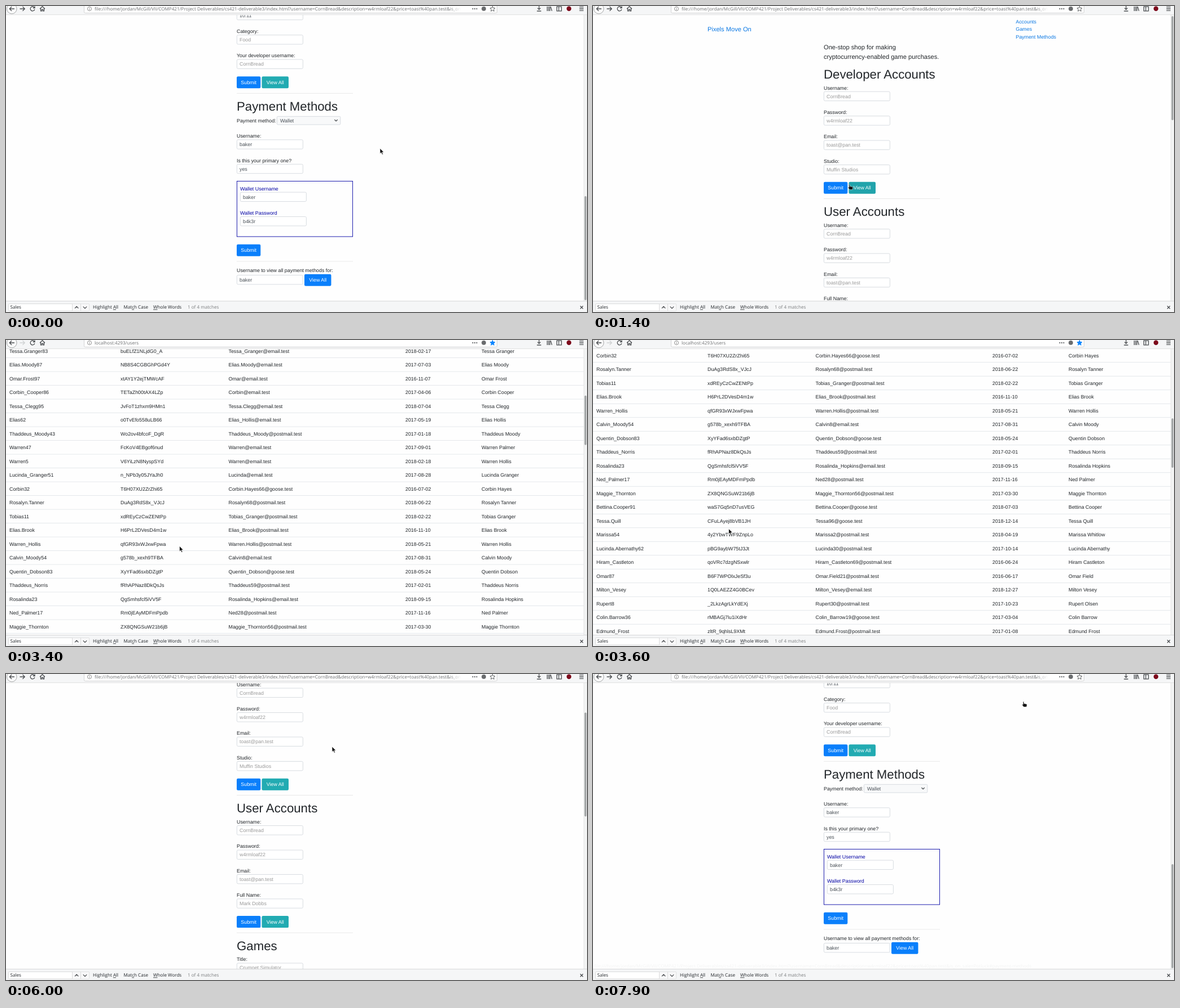
An HTML page for the animation above (8 s loop, 1030 px wide and 544 px high).

```html
<!DOCTYPE html>
<html lang="en">
<head>
<meta charset="utf-8">
<title>Game store demo</title>
<style>
html, body { margin: 0; width: 100%; height: 100%; overflow: hidden; background: #fefefe; }
svg { display: block; width: 1030px; height: 544px; text-rendering: geometricPrecision; }
text { font-family: "Liberation Sans", Arial, sans-serif; white-space: pre; }
.ui text { font-family: "Open Sans", "Noto Sans", sans-serif; }
.icon { fill: none; stroke: #4a4d50; stroke-width: 1.3; }
.u { text-decoration: underline; }
</style>
</head>
<body>
<svg id="stage" viewBox="0 0 1030 544"></svg>
<script>
const LOOP = 8000, STEP = 100;
const BASE = 8.89, LEAD = 11.11, TITLE = 22.22;
const FIELD = 43.4, ROW = 24.5, END = 806.4;
const INK = '#212529', MUTED = '#999', VALUE = '#495057', BLUE = '#0a7ffb', TEAL = '#22abb2', LINK = '#0b78e3', NAVY = '#0000a4';

// Markup helpers; y is the vertical middle of the text or box
const text = (x, y, s, size = BASE, fill = INK, more = '') =>
  `<text x="${x}" y="${y + size * .36}" font-size="${size}" fill="${fill}" ${more}>${s}</text>`;
const rect = (x, y, w, h, fill, more = '') =>
  `<rect x="${x}" y="${y}" width="${w}" height="${h}" fill="${fill}" ${more}/>`;
const path = (d, more = 'class="icon"') => `<path d="${d}" ${more}/>`;
const group = (id, s, more = '') => `<g id="${id}" ${more}>${s}</g>`;
const rule = y => rect(409, y - .4, 206, .8, '#e3e3e3');

const input = (x, y, s, fill = MUTED) =>
  rect(x + .4, y - 8.2, 117, 16.4, '#fff', 'rx="2" stroke="#ced4da" stroke-width=".8"') +
  text(x + 5, y, s, BASE, fill);
const field = (x, y, label, s, fill, ink) => text(x, y, label, BASE, ink) + input(x, y + 15, s, fill);
const button = (x, y, w, s, fill, hover = '') =>
  rect(x, y - 10.5, w, 21, fill, 'rx="2.2"') +
  (hover && rect(x, y - 10.5, w, 21, '#1c8a94', `rx="2.2" id="${hover}" opacity="0"`)) +
  text(x + w / 2, y, s, BASE, '#fff', 'text-anchor="middle"');

function section(y, title, fields, hover) {
  const end = y + 24.4 + FIELD * fields.length;
  return text(409, y, title, TITLE) +
    fields.map(([label, s, fill], i) => field(409, y + 24.4 + FIELD * i, label, s, fill)).join('') +
    button(409, end + 4.2, 42.3, 'Submit', BLUE) +
    button(453.5, end + 4.2, 47.5, 'View All', TEAL, hover) +
    rule(end + 23.6);
}

const login = [['Username:', 'CornBread'], ['Password:', 'w4rmloaf22'], ['Email:', 'toast@pan.test']];

const payment =
  text(409, 178, 'Payment Methods', TITLE) +
  text(409, 203.5, 'Payment method:') +
  rect(480.4, 196.3, 112.4, 14.6, '#f8f9fa', 'rx="1.5" stroke="#ced4da" stroke-width=".8"') +
  text(486, 203.5, 'Wallet', BASE, VALUE) +
  path('M582.5 202l2.6 2.6 2.6-2.6') +
  field(409, 231, 'Username:', 'baker', VALUE) +
  field(409, 274.5, 'Is this your primary one?', 'yes', VALUE) +
  rect(409.4, 311.4, 205.2, 98.6, 'none', `stroke="${NAVY}" stroke-width=".9"`) +
  field(415, 324.3, 'Wallet Username', 'baker', VALUE, NAVY) +
  field(415, 367.7, 'Wallet Password', 'b4k3r', VALUE, NAVY) +
  button(409, 434.2, 42.3, 'Submit', BLUE) + rule(454) +
  text(409, 470, 'Username to view all payment methods for:') +
  input(409, 486.7, 'baker', VALUE) +
  button(529, 487.2, 47.5, 'View All', BLUE);

const home =
  text(203, 41, 'Pixels Move On', LEAD, LINK) +
  text(749.5, 27.5, 'Accounts', BASE, LINK) +
  text(749.5, 41, 'Games', BASE, LINK) +
  text(749.5, 54.3, 'Payment Methods', BASE, LINK, 'id="payLink"') +
  text(409, 73.5, 'One-stop shop for making', LEAD) +
  text(409, 90.2, 'cryptocurrency-enabled game purchases.', LEAD) +
  section(121, 'Developer Accounts', [...login, ['Studio:', 'Muffin Studios']], 'devHover') +
  section(365.4, 'User Accounts', [...login, ['Full Name:', 'Mark Dobbs']], 'userHover') +
  section(609.8, 'Games', [
    ['Title:', 'Crumpet Simulator'], ['Description:', 'Bake all day'], ['Price:', '20.22'],
    ['Is on sale?', 'yes'], ['Sale price:', '10.11', VALUE], ['Category:', 'Food'],
    ['Your developer username:', 'CornBread']]) +
  `<g transform="translate(0 ${END})">${payment}</g>`;

// User table: full name | user name | password | mail | date; F and L stand for first and last name
const people = `Corbin Hayes|F32|T6H07XU2ZrZhi65|F.L66@y|2016-07-02
Rosalyn Tanner|F.L|DuAg3RdS8x_VJcJ|F68@h|2018-06-22
Tobias Granger|F11|xdREyCzCwZENtPp|F_L@h|2018-02-22
Elias Brook|F.L|H6PrL2DVesD4m1w|F_L@h|2016-11-10
Warren Hollis|F_L|qfGR93xWJxwFpwa|F.L@h|2018-05-21
Calvin Moody|F_L54|g578b_xexh9TFBA|F8@g|2017-08-31
Quentin Dobson|F_L83|XyYFad6sxbDZgtP|F_L@y|2018-05-24
Thaddeus Norris|F_L|fRhAPNaz8DkQsJs|F59@h|2017-02-01
Rosalinda Hopkins|F23|QgSmhsfcl5iVV5F|F_L@g|2018-09-15
Ned Palmer|F_L17|Rm0jEAyMDFmPpdb|F28@h|2017-11-16
Maggie Thornton|F_L|ZX8QNGSuW21b6jB|F_L56@h|2017-03-30
Bettina Cooper|F.L91|waS7Gq5nD7usVEG|F.L@y|2018-07-03
Tessa Quill|F.L|CFuLAyej8bVB1JH|F96@y|2018-12-14
Marissa Whitlow|F54|4y2YbwTWF9ZnpLo|F2@h|2018-04-19
Lucinda Abernathy|F.L62|pBG9aybW75tJ3Jt|F30@h|2017-10-14
Hiram Castleton|F_L|qoVRc7dzgNSxwlr|F_L69@h|2016-06-24
Omar Field|F87|B6F7WPOlxJeSf3u|F.L21@h|2016-06-17
Milton Vesey|F_L|1Q0LAEZZ4G0BCev|F_L@g|2018-12-27
Rupert Olsen|F8|_2LkzAgrLkYdEXj|F30@h|2017-10-23
Colin Barrow|F.L36|rMBAGj7lu1iXdHr|F_L19@y|2017-03-04
Edmund Frost|F_L|zltR_9qhlsL9XMt|F.L@h|2017-01-08
Nora Jenkins|F49|0esHSBt0lbQ3sXL|F63@g|2017-08-28
Sabina Clegg|F.L87|_hQoAR_G6Pr28km|F.L@g|2017-04-28`.split('\n').map(s => s.split('|'));
const hosts = { h: 'postmail.test', y: 'goose.test', g: 'email.test' };

let seed = 7;
const rnd = n => (seed = (seed * 16807) % 2147483647) % n;
const chars = 'ABCDEFGHJKLMNPRSTUVWXYZabcdefghijkmnoprstuvwxyz0123456789_';
const two = n => String(n + 1).padStart(2, '0');
function stranger() {
  const first = people[rnd(23)][0].split(' ')[0], last = people[rnd(23)][0].split(' ')[1];
  return [`${first} ${last}`, ['F_L', 'F.L', 'F'][rnd(3)] + rnd(99),
    Array.from({ length: 15 }, () => chars[rnd(chars.length)]).join(''),
    ['F_L@', 'F.L@', 'F@'][rnd(3)] + 'hyg'[rnd(3)],
    `${2016 + rnd(3)}-${two(rnd(12))}-${two(rnd(28))}`];
}

const columns = [6, 203, 394.5, 708, 843];
const PICKED = 41;
const rows = [...Array.from({ length: 28 }, stranger), ...people];
const line = (cells, i, more = '') => {
  const y = 27.5 + ROW * i;
  return cells.map((s, c) => text(columns[c], y, s, BASE, INK,
    more + (i === PICKED + 1 && !c ? ' id="picked"' : ''))).join('') +
    rect(0, y + ROW / 2 - .4, 1024, .8, '#dee2e6');
};
const table = rect(6, 27.5 + ROW * (PICKED + 1) - 5.5, 41, 11, '#4a90d9', 'id="mark"') +
  line(['Username', 'Password', 'Email', 'Date Created', 'Full Name'], 0, 'font-weight="bold"') +
  rows.map(([name, user, pass, mail, date], i) => {
    const [first, last] = name.split(' ');
    const fill = s => s.replace(/[FL]/g, c => c === 'F' ? first : last);
    const [box, host] = mail.split('@');
    return line([fill(user), pass, `${fill(box)}@${hosts[host]}`, date, name], i + 1);
  }).join('');

// Browser frame
const UI = 8.1;
const address = ('file:///home/jordan/McGill/VII/COMP421/Project Deliverables/cs421-deliverable3/' +
  'index.html?username=CornBread&description=w4rmloaf22&price=toast%40pan.test&is_on_sa').replace(/&/g, '&amp;');
const under = s => `<tspan class="u">${s}</tspan>`;
const toolbar =
  rect(0, 0, 1030, 16, '#f5f6f7') + rect(0, 15.2, 1030, .8, '#dcdddd') +
  rect(138.5, -8, 732, 20.5, '#fff', 'rx="2" stroke="#c9cacb" stroke-width=".8"') +
  '<circle cx="10.3" cy="5" r="8.8" fill="#fbfbfb" stroke="#9a9c9e" stroke-width=".9"/>' +
  path('M15 5H6.5M10 1.3L6.3 5l3.7 3.7') +
  path('M24.5 5h8.5M29.5 1.3L33.2 5l-3.7 3.7', 'class="icon" id="forward"') +
  path('M50.2 2.6A3.9 3.9 0 1 0 50.8 6M51 .5v3h-3') +
  path('M60 5l4.5-4.2L69 5M61.5 4.6v4.2h2v-2.6h2v2.6h2V4.6') +
  '<circle cx="148" cy="5" r="3.6" class="icon" style="stroke:#777;stroke-width:.8"/>' +
  path('M148 4.5v2.6M148 2.8v.9', 'class="icon" style="stroke:#777;stroke-width:.9"') +
  text(157, 5, '', UI, '#6c6e70', 'id="address"') +
  rect(786, 0, 38, 12, 'url(#fade)') +
  [827.5, 831, 834.5].map(x => `<circle cx="${x}" cy="5" r="1.1" fill="#4a4d50"/>`).join('') +
  '<circle cx="847" cy="4.8" r="3.9" fill="#6a6c6e"/>' +
  path('M862.5 .5l1.3 3 3.2.3-2.4 2.2.7 3.3-2.8-1.7-2.8 1.7.7-3.3-2.4-2.2 3.2-.3Z', 'class="icon" id="star" style="stroke-width:.9"') +
  path('M945 0v6M942.3 3.6L945 6.3l2.7-2.7M941.3 9h7.4') +
  path('M959.5 1v8M962 1v8M964.2 1v8M965.5 1.2l2.3 7.6') +
  path('M976.5 1.2h8.2v7.6h-8.2ZM980 1.2v7.6') +
  '<circle cx="998" cy="4.7" r="4.2" fill="#7d0a1c"/>' +
  path('M1016.5 1.8h7.4M1016.5 5h7.4M1016.5 8.2h7.4');
const findbar =
  rect(0, 524.5, 1030, 19.5, '#f5f6f7') + rect(0, 524.3, 1030, .8, '#cfd0d1') +
  rect(4.4, 529.4, 143.2, 12.6, '#fff', 'rx="1.5" stroke="#d2d3d4" stroke-width=".8"') +
  rect(117.5, 529.8, 29.7, 11.8, '#f8f8f9') +
  path('M117.5 529.5v12.4M132.5 529.5v12.4', 'stroke="#d2d3d4" stroke-width=".8"') +
  path('M122 537.4l3.2-3.2 3.2 3.2M136.8 534.4l3.2 3.2 3.2-3.2') +
  text(7.5, 535.5, 'Sales', UI) +
  text(154, 535.5, `Highlight ${under('A')}ll`, UI) +
  text(208.5, 535.5, `Mat${under('c')}h Case`, UI) +
  text(261, 535.5, `${under('W')}hole Words`, UI) +
  text(322, 535.5, '1 of 4 matches', UI, '#7b7d7f') +
  path('M1018 533.2l5 5M1023 533.2l-5 5');

const stage = document.getElementById('stage');
stage.innerHTML =
  '<defs><linearGradient id="fade"><stop stop-color="#fff" stop-opacity="0"/><stop offset=".55" stop-color="#fff"/></linearGradient></defs>' +
  rect(0, 0, 1030, 544, '#fefefe') + group('home', home) + group('table', table) +
  rect(1024, 16, 6, 509, '#f3f4f4') + rect(1024, 16, .7, 509, '#dfe0e0') +
  rect(1025.5, 18, 3.6, 185, '#a4a7a8', 'rx="1.8" id="thumb"') +
  group('looking', rect(-1, 513, 180, 13, '#f5f6f7', 'stroke="#d4d5d6" stroke-width=".8"') +
    text(2, 519, 'Looking up localhost…', UI), 'class="ui"') +
  group('ghost', text(2, 519, address + 'le=Potluck#payment-methods', UI, '#f3f4f4'), 'class="ui"') +
  `<g class="ui">${toolbar}${findbar}</g>` +
  group('cursor',
    path('M0 0v9.6l2.2-2 1.6 3.6 1.7-.8-1.6-3.4h3Z', 'fill="#111" stroke="#fff" stroke-width=".7"') +
    path('M-.6.6q.8-1 1.6 0v3l4 .6q1.5.3 1.3 1.8l-.7 3.6h-5l-3-3.8q.2-1.3 1.8-.4Z', 'fill="#111" stroke="#fff" stroke-width=".5"') +
    path('M-1.8-3q1.8 0 1.8 1v8q0 1-1.8 1M1.8-3q-1.8 0-1.8 1M0 6q0 1 1.8 1', 'fill="none" stroke="#111" stroke-width=".9"'));
const el = Object.fromEntries([...stage.querySelectorAll('[id]')].map(e => [e.id, e]));

// Tracks: [time, values...], linear in between
const homeScroll = [[300, END], [700, 430], [800, 430], [1300, 0], [1600, 0], [2300, 127],
  [6300, 127], [6400, 40], [6500, 0], [7800, 0], [7900, END]];
const tableScroll = [[3000, 0], [3600, ROW * 29], [4100, ROW * 31 - 3]];
const pointer = [[800, 663, 253], [1400, 454.5, 317], [1600, 454.5, 317], [2500, 475, 443.5], [2900, 475, 443.5],
  [3600, 240.5, 335.5], [4200, 40, 298], [4400, 40, 298], [4700, 196, 252.5], [5000, 196, 252.5], [5100, 71, 48],
  [5400, 14, 7], [5600, 14, 7], [6200, 860, 190], [6300, 860, 190], [6500, 906, 160], [6600, 906, 160],
  [6900, 867, 89], [7300, 797, 59], [7500, 797, 59], [7700, 763, 49]];
const devGlow = [[1300, 0], [1400, .25], [1500, 1], [1700, 1], [1800, 0]];
const userGlow = [[2400, 0], [2600, 1]];

function at(track, t) {
  const i = track.findIndex(k => k[0] > t);
  if (i < 1) return track.at(i).slice(1);
  const a = track[i - 1], b = track[i], p = (t - a[0]) / (b[0] - a[0]);
  return a.map((v, j) => v + (b[j] - v) * p).slice(1);
}
const within = (t, from, to) => t >= from && t < to;
const show = (e, on) => e.style.display = on ? '' : 'none';
const move = (e, x, y) => e.setAttribute('transform', `translate(${x} ${y})`);

function draw(t) {
  const users = within(t, 3000, 5700);
  const [scroll] = at(users ? tableScroll : homeScroll, t);
  show(el.home, !users);
  show(el.table, users);
  move(users ? el.table : el.home, 0, -scroll);
  el.thumb.setAttribute('y', 18 + scroll * (users ? .1705 : 320 / END));
  el.thumb.setAttribute('height', users ? 88 : 185);

  el.address.innerHTML = users ? 'localhost:4293/users' : address;
  el.forward.style.stroke = users ? '#d0d2d3' : '';
  el.star.style.fill = users ? '#0a84ff' : 'none';
  el.star.style.stroke = users ? '#0a84ff' : '';
  show(el.looking, within(t, 2700, 3000));
  show(el.ghost, t >= 7900);

  el.devHover.setAttribute('opacity', at(devGlow, t)[0]);
  el.userHover.setAttribute('opacity', t < 3000 ? at(userGlow, t)[0] : 0);
  el.payLink.style.textDecoration = within(t, 7600, 7900) ? 'underline' : 'none';
  const picked = t >= 4400;
  show(el.mark, picked);
  el.picked.setAttribute('fill', picked ? '#fff' : INK);
  if (users) el.mark.setAttribute('width', el.picked.getComputedTextLength());

  const hand = within(t, 1400, 1700) || within(t, 2500, 3000) || t >= 7600;
  const kind = hand ? 1 : within(t, 4200, 4500) ? 2 : 0;
  [...el.cursor.children].forEach((e, i) => show(e, i === kind));
  move(el.cursor, ...at(pointer, t));
}

const start = performance.now();
function tick() {
  const t = (performance.now() - start) % LOOP;
  draw(Math.floor(t / STEP) * STEP);
  requestAnimationFrame(tick);
}
tick();
</script>
</body>
</html>
```
